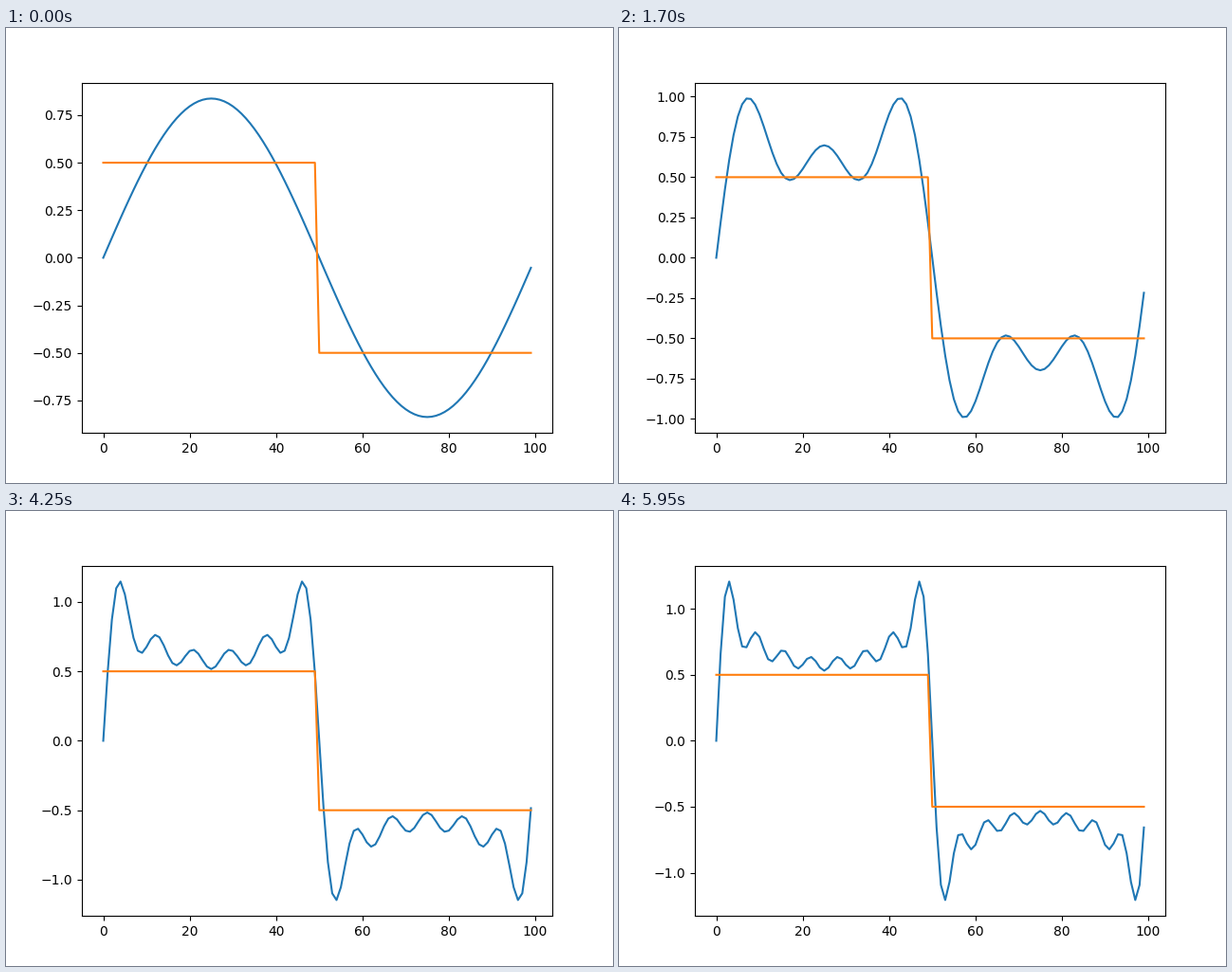
A matplotlib script for the animation above (6800 ms loop, 640 by 480 pixels).

```python
import matplotlib.pyplot as plt
import numpy as np
from matplotlib.animation import FuncAnimation

SAMPLES = 100
HARMONICS = 8
AMPLITUDE = 0.8375

x = np.arange(SAMPLES)
square = np.where(x < SAMPLES // 2, 0.5, -0.5)


def partial_sum(terms):
    """Sum of the first odd harmonics, the k-th weighted by 1/k."""
    k = np.arange(1, terms + 1)[:, None]
    waves = np.sin((2 * k - 1) * 2 * np.pi * x / SAMPLES) / k
    return AMPLITUDE * waves.sum(axis=0)


fig, ax = plt.subplots(figsize=(6.4, 4.8), dpi=100)


def draw(frame):
    ax.clear()
    return ax.plot(x, partial_sum(frame + 1)) + ax.plot(x, square)


anim = FuncAnimation(fig, draw, frames=HARMONICS, init_func=lambda: draw(0),
                     interval=850, repeat=True, repeat_delay=0)
plt.show()
```
